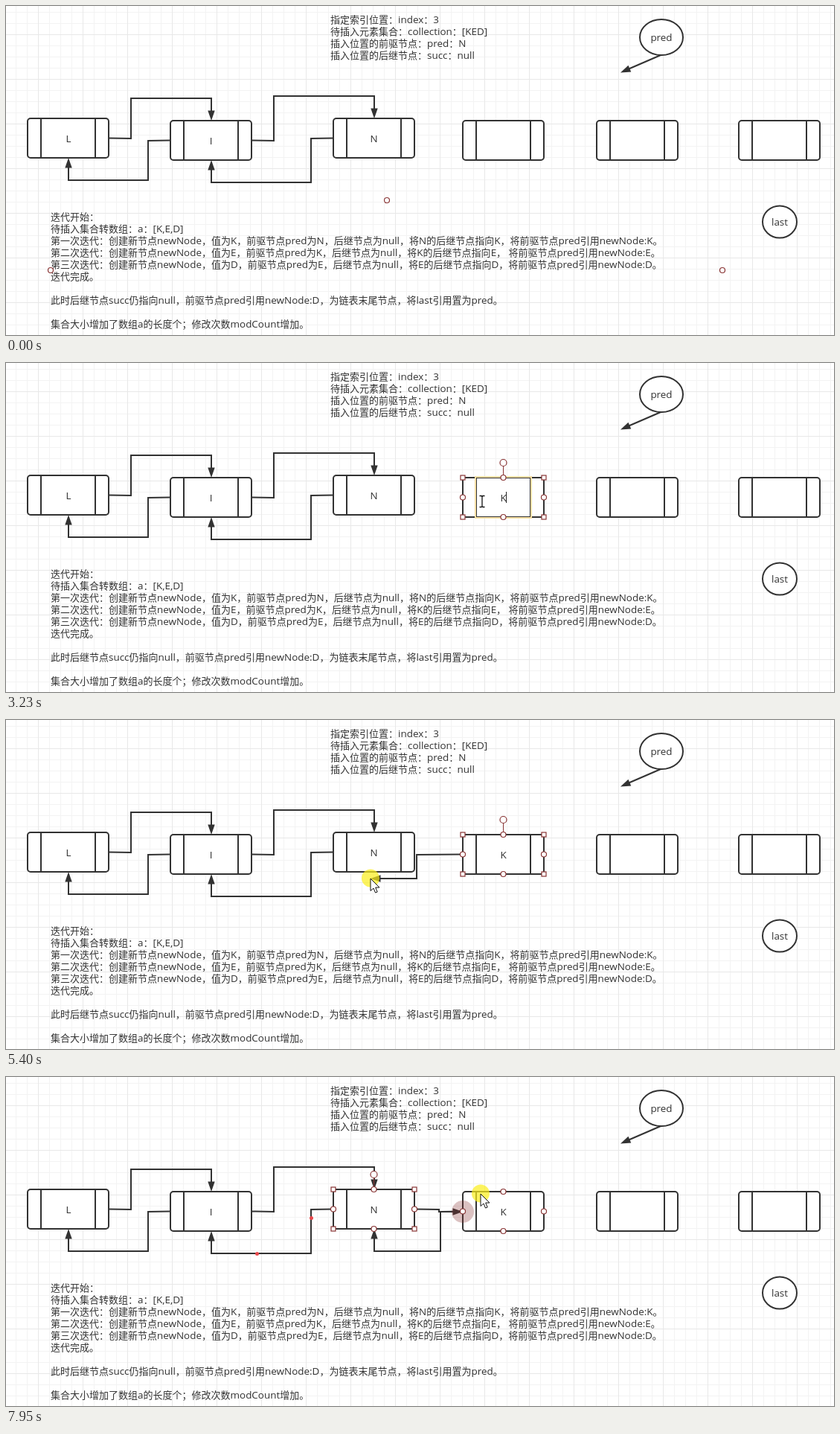
Animation, 1113 px wide and 442 px high, one loop 8 s. Source, as an HTML page:

```html
<!DOCTYPE html>
<html lang="zh-CN">
<head>
<meta charset="utf-8">
<title>链表批量插入</title>
<style>
  html, body { margin: 0; width: 100%; height: 100%; overflow: hidden; background: #fff; }
  svg { display: block; }
  text { font: 13px "Open Sans", "Noto Sans CJK SC", sans-serif; fill: #323232; white-space: pre; }
  .latin { font-size: 13.45px; }
  .mid { text-anchor: middle; }
  .ink { fill: none; stroke: #323232; stroke-width: 2; }
  .solid { fill: #fff; }
  .tip { fill: #323232; }
  .handle { fill: #fff; stroke: #883333; stroke-width: 1.2; }
  .dot { fill: #e8474b; }
</style>
</head>
<body>
<svg id="stage" width="1113" height="442" viewBox="0 0 1113 442"></svg>
<script>
const DURATION = 8000, STEP = 77.3, FIRST = 140;
const W = 109, H = 53;

const boxes = {
  L: [29, 151], I: [221, 154], N: [440, 151], K: [614, 154], E: [794, 154], D: [985, 154]
};

const notes = [
  [436, 23, ['指定索引位置：index：3', '待插入元素集合：collection：[KED]',
    '插入位置的前驱节点：pred：N', '插入位置的后继节点：succ：null']],
  [60, 288, ['迭代开始：', '待插入集合转数组：a：[K,E,D]',
    '第一次迭代：创建新节点newNode，值为K，前驱节点pred为N，后继节点为null，将N的后继节点指向K，将前驱节点pred引用newNode:K。',
    '第二次迭代：创建新节点newNode，值为E，前驱节点pred为K，后继节点为null，将K的后继节点指向E， 将前驱节点pred引用newNode:E。',
    '第三次迭代：创建新节点newNode，值为D，前驱节点pred为E，后继节点为null，将E的后继节点指向D，将前驱节点pred引用newNode:D。',
    '迭代完成。', '',
    '此时后继节点succ仍指向null，前驱节点pred引用newNode:D，为链表末尾节点，将last引用置为pred。', '',
    '集合大小增加了数组a的长度个；修改次数modCount增加。']]
];

// pointer track: time, x, y
const track = [
  [140, 700, 350], [300, 690, 300], [680, 661, 176], [1270, 661, 176], [1295, 674, 184],
  [1600, 674, 184], [1680, 675, 179], [2990, 675, 179], [3230, 640, 186], [3540, 566, 207],
  [3780, 600, 195], [4320, 610, 183], [4550, 610, 183], [5180, 496, 206], [5300, 496, 206],
  [5390, 490, 213], [5800, 490, 213], [5960, 496, 206], [6150, 496, 206], [6410, 557, 187],
  [6650, 557, 187], [6890, 530, 180], [7050, 530, 180], [7260, 549, 178], [7340, 549, 178],
  [7570, 614, 181], [7940, 638, 157]
];

const pressed = [[830, 980], [4550, 5640], [5800, 6150], [6880, 7000], [7330, 9000]];
const caretEmpty = [[1150, 1675]];
const caretTyped = [[2155, 2615], [3150, 3680], [4210, 4550]];

const within = (t, spans) => spans.some(([a, b]) => t >= a && t < b);
const latin = s => s.replace(/[\x21-\x7e]+/g, '<tspan class="latin">$&</tspan>');
const label = (x, y, s) => `<text class="mid" x="${x}" y="${y + 4.7}">${latin(s)}</text>`;
const circle = (x, y, r = 3.5) => `<circle class="handle" cx="${x}" cy="${y}" r="${r}"/>`;
const dot = (x, y) => `<circle class="dot" cx="${x}" cy="${y}" r="2.5"/>`;
const group = (id, body) => `<g id="${id}" visibility="hidden">${body}</g>`;

const node = ([x, y]) => `<rect class="ink solid" x="${x}" y="${y}" width="${W}" height="${H}" rx="4"/>
  <path class="ink" d="M${x + 18} ${y}v${H}M${x + 91} ${y}v${H}"/>`;

const arrowHead = (x, y, angle) =>
  `<path class="tip" d="M0 0L-13.5 -4.7V4.7Z" transform="translate(${x} ${y}) rotate(${angle})"/>`;
const link = (d, x, y, angle) => `<path class="ink" d="${d}"/>` + arrowHead(x, y, angle);

const anchors = ([x, y]) => circle(x + W / 2, y) + circle(x + W, y + H / 2) +
  circle(x + W / 2, y + H) + circle(x, y + H / 2);

const selection = ([x, y]) => {
  const corners = [[x, y], [x + W, y], [x, y + H], [x + W, y + H]];
  return `<path d="M${x + W / 2} ${y}v-16" stroke="#883333"/>` + circle(x + W / 2, y - 20, 4.5) +
    corners.map(([a, b]) => `<rect class="handle" x="${a - 3}" y="${b - 3}" width="6" height="6"/>`).join('') +
    anchors([x, y]);
};

const gridLines = (offset, step) => {
  let d = '';
  for (let x = offset[0]; x < 1113; x += step) d += `M${x + .5} 0V442`;
  for (let y = offset[1]; y < 442; y += step) d += `M0 ${y + .5}H1113`;
  return d;
};

const stage = document.getElementById('stage');
stage.innerHTML = `
  <path d="${gridLines([13, 8], 15)}" stroke="#f3f3f3"/>
  <path d="${gridLines([43, 38], 60)}" stroke="#e8e8e8"/>
  ${Object.values(boxes).map(node).join('')}
  ${label(84, 178, 'L')}${label(275.5, 181, 'I')}${label(494.5, 178, 'N')}
  ${link('M138 177.5L168 178V124H276V142', 276, 154, 90)}
  ${link('M330 180.5L360 181V121H495V139', 495, 151, 90)}
  ${link('M221 180.5L191 181V234H84V216', 84, 204, -90)}
  ${link('M440 177.5L410 178V237H276V219', 276, 207, -90)}
  <ellipse class="ink solid" cx="881" cy="42" rx="29" ry="24"/>${label(881, 42, 'pred')}
  ${link('M880 66L836 85', 826, 89.5, 156.5)}
  <ellipse class="ink solid" cx="1040" cy="290" rx="23" ry="21.5"/>${label(1040, 290, 'last')}
  ${notes.map(([x, y, lines]) => lines.map((s, i) =>
    `<text x="${x}" y="${y + 16 * i}">${latin(s)}</text>`).join('')).join('')}
  ${group('textHover', circle(512, 261) + circle(60, 355) + circle(963, 355))}
  ${group('guide', '<path d="M0 181.5H1113" stroke="#883333"/>')}
  ${group('linkBack', link('M614 180.5L584 181V234H495V216', 495, 204, -90))}
  ${group('linkNext', link('M549 177.5L582 178V181H602', 614, 181, 0))}
  ${group('drag', '<path class="ink" id="dragLine"/><g id="dragTip">' + arrowHead(0, 0, 0) + '</g>')}
  ${group('editor', `<rect x="631" y="153" width="75" height="55" fill="#fff" stroke="#f6dfa4" stroke-width="2"/>
    <rect x="632.5" y="154.5" width="72" height="52" fill="none" stroke="#323232"/>`)}
  ${group('letter', label(668.7, 181, 'K'))}
  ${group('caret', '<path id="caretLine" stroke="#222"/>')}
  ${group('pink', '<circle id="pinkDisc" r="15" fill="#883333" opacity=".3"/>')}
  ${group('kHover', anchors(boxes.K))}
  ${group('kSelect', selection(boxes.K))}
  ${group('nHover', anchors(boxes.N))}
  ${group('nSelect', selection(boxes.N))}
  ${group('kDots', dot(584.5, 198.5) + dot(499.5, 234.5))}
  ${group('nDots', dot(410.5, 189.5) + dot(337.5, 237.5))}
  <g id="pointer">
    ${group('halo', '<circle cy="-.5" r="12" fill="#fbee1a" opacity=".7"/>')}
    ${group('arrow', '<path d="M0 0V16.5L4 13L6.5 19L9.2 18L6.7 12H12Z" fill="#fff" stroke="#111"/>')}
    ${group('beam', '<path d="M-3.5 -7.5H-1L0 -6.5L1 -7.5H3.5M0 -6.5V6.5M-3.5 7.5H-1L0 6.5L1 7.5H3.5" fill="none" stroke="#111" stroke-width="1.3"/>')}
    ${group('cross', '<path d="M-12 0H12M0 -12V12" stroke="#000" stroke-width="2.5"/>')}
  </g>`;

const el = {};
stage.querySelectorAll('[id]').forEach(e => el[e.id] = e);
const show = (id, on) => el[id].setAttribute('visibility', on ? 'visible' : 'hidden');

function pointerAt(t) {
  const i = track.findIndex(k => k[0] > t);
  if (i < 0) return track[track.length - 1].slice(1);
  if (i === 0) return track[0].slice(1);
  const [t0, x0, y0] = track[i - 1], [t1, x1, y1] = track[i];
  const p = (t - t0) / (t1 - t0);
  return [x0 + (x1 - x0) * p, y0 + (y1 - y0) * p].map(Math.round);
}

function render(time) {
  const t = FIRST + Math.floor((time - FIRST) / STEP + .2) * STEP;
  const [x, y] = pointerAt(t);
  const on = (a, b) => t >= a && t < b;

  const cross = on(3860, 4540) || on(7200, 7330);
  const beam = on(1280, 3320);
  el.pointer.setAttribute('transform', `translate(${x} ${y})`);
  show('cross', cross);
  show('beam', beam);
  show('arrow', t >= 130 && !cross && !beam);
  show('halo', within(t, pressed));

  show('textHover', t < 420);
  show('guide', on(825, 975));
  show('editor', on(1145, 4550));
  show('letter', t >= 2155);
  const typed = within(t, caretTyped);
  show('caret', typed || within(t, caretEmpty));
  el.caretLine.setAttribute('d', `M${typed ? 672.5 : 668.5} 173V188`);

  const snapN = on(5140, 5330) || on(5880, 6230);
  const snapK = t >= 7560;
  show('kHover', on(600, 825) || snapK);
  show('kSelect', on(825, 6880));
  show('nHover', snapN || on(6720, 6880));
  show('nSelect', t >= 6880);
  show('kDots', on(6150, 6880));
  show('nDots', t >= 6880);
  show('pink', snapN || snapK);
  el.pinkDisc.setAttribute('cx', snapK ? 614 : 495);
  el.pinkDisc.setAttribute('cy', snapK ? 181 : 204);

  show('linkBack', snapN || t >= 6150);
  show('linkNext', snapK);
  const fromK = on(4600, 5880) && !snapN;
  show('drag', fromK || on(7380, 7560));
  const [sx, sy] = fromK ? [614, 180.5] : [549, 177.5];
  const side = fromK ? 1 : -1;
  const bend = Math.round((sx + x) / 2);
  el.dragLine.setAttribute('d', `M${sx} ${sy}L${bend} ${sy + .5}V${y}H${x + 10 * side}`);
  el.dragTip.setAttribute('transform', `translate(${x} ${y}) rotate(${fromK ? 180 : 0})`);
}

const start = performance.now();
function tick() {
  render((performance.now() - start) % DURATION);
  requestAnimationFrame(tick);
}
tick();
</script>
</body>
</html>
```
